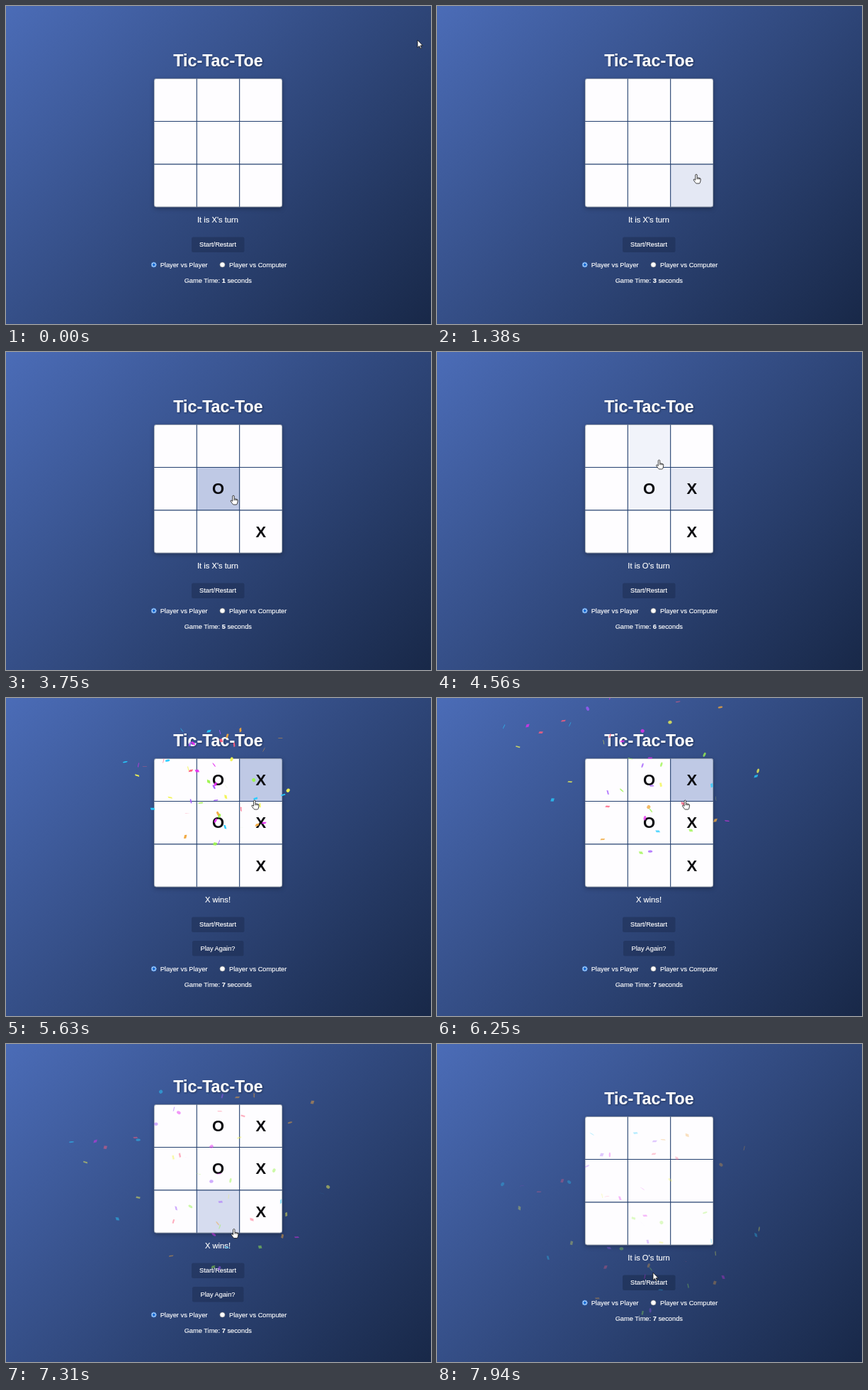
Write an HTML page that moves like this. It is 600 px wide and 448 px high and loops after 8000 ms.

```html
<!DOCTYPE html>
<html lang="en">
<head>
<meta charset="utf-8">
<title>Tic-Tac-Toe</title>
<style>
  html, body { margin: 0; width: 100%; height: 100%; overflow: hidden; }
  body { background: linear-gradient(135deg, #4b6cb7, #182848); }
  svg { display: block; width: 600px; height: 448px; font-family: "Liberation Sans", Arial, sans-serif; }
  text { fill: #fff; font-size: 9.27px; stroke: #fff; stroke-width: .15px; }
  .mid { text-anchor: middle; }
  .title { font-size: 23.2px; font-weight: bold; text-shadow: 1px 1px 2.5px rgba(0, 0, 0, .35); }
  .status { font-size: 11.2px; }
  .mark { font-size: 22px; font-weight: bold; fill: #0b0b0f; stroke: none; }
  .button rect { fill: #182848; fill-opacity: .42; }
  .board { filter: drop-shadow(0 2px 3px rgba(0, 0, 0, .3)); }
  .bold { font-weight: bold; }
</style>
</head>
<body>
<svg viewBox="0 0 600 448">
  <defs><clipPath id="round"><rect x="209" y="102.2" width="181" height="181" rx="3"/></clipPath></defs>
  <g id="upper">
    <text class="mid title" x="299.5" y="85">Tic-Tac-Toe</text>
    <rect class="board" x="209" y="102.2" width="181" height="181" rx="3" fill="#fefdff"/>
    <g id="cells" clip-path="url(#round)"></g>
    <g id="lines" stroke="#24406f" stroke-width="1.1"></g>
    <rect x="209.2" y="102.4" width="180.6" height="180.6" rx="3" fill="none" stroke="#5f6c7c" stroke-width=".6"/>
    <g id="marks"></g>
    <text class="mid status" id="status" x="299" y="305"></text>
    <g class="button">
      <rect id="start" x="262" y="325.5" width="74.5" height="21.5" rx="2.5"/>
      <text class="mid" x="299" y="339.3">Start/Restart</text>
    </g>
  </g>
  <g class="button" id="again">
    <rect x="263" y="342" width="72.5" height="21.5" rx="2.5"/>
    <text class="mid" x="299" y="356">Play Again?</text>
  </g>
  <g id="lower">
    <circle cx="208.7" cy="364.5" r="3.5" fill="#fff" stroke="#3b82dc"/>
    <circle cx="208.7" cy="364.5" r="2.2" fill="#1a6fd8"/>
    <text x="217.7" y="367.8">Player vs Player</text>
    <circle cx="305.5" cy="364.5" r="3.6" fill="#fff" stroke="#767676" stroke-width=".6"/>
    <text x="315" y="367.8">Player vs Computer</text>
    <text class="mid" x="299.3" y="390">Game Time: <tspan class="bold" id="clock"></tspan> seconds</text>
  </g>
  <g id="confetti"></g>
  <path id="cursor" fill="#fff" stroke="#111" stroke-width=".8" stroke-linejoin="round"/>
</svg>
<script>
const LOOP = 8000, STEP = 62.5, FADE = 300, LIFT = 17;
const CLICKS = [1625, 3120, 4000, 4875, 5375];
const WIN = CLICKS[4], RESET = 7812, BURST = 5450;
const LEFT = 209, TOP = 102.2, CELL = 181 / 3, START = 9;

// confetti physics, per tick
const COUNT = 50, TICK = 18.3, TICKS = 200, DECAY = .9, GRAVITY = 1.74, SPEED = 26, SCALE = .6;
const ORIGIN = { x: 300, y: 269 };
const COLORS = ["#26ccff", "#a25afd", "#ff5e7e", "#9cf54e", "#f2f552", "#f0a63c", "#e62ff0"];

const ARROW = "M0 0V10.5L2.5 8.3L4.1 12L5.6 11.3L4.1 7.8H7.3Z";
const HAND = "M-1.2 .8Q0 -.8 1.2 .8V4.8L5 5.5Q6.5 6 6.3 7.5L5.6 11.2Q5.3 13 4 13H.3Q-.8 12.8 -1.5 11.5L-3.8 8.2Q-4 6.9 -2.8 7L-1.2 8.3ZM1.2 5V7.2M3.1 5.4V7.3M4.9 5.8V7.5";

// time, x, y of the pointer tip
const PATH = [
  [0, 581, 48], [1000, 452, 190], [1375, 366, 237], [2600, 366, 237], [2687, 324, 209],
  [3700, 316, 206], [3900, 336, 190], [4375, 336, 190], [4562, 313.5, 152], [5125, 312, 139],
  [5300, 351, 144], [6625, 350, 144], [6750, 347.5, 166], [6880, 347, 168], [7600, 305, 322], [8000, 305, 322]
];

const $ = id => document.getElementById(id);
const clamp = v => Math.max(0, Math.min(1, v));
const show = (el, on) => el.style.display = on ? "" : "none";
const playing = t => t >= WIN && t < RESET;

function add(parent, tag, attrs, text = "") {
  const el = document.createElementNS("http://www.w3.org/2000/svg", tag);
  for (const key in attrs) el.setAttribute(key, attrs[key]);
  el.textContent = text;
  return $(parent).appendChild(el);
}

let seed = 11;
function random() {
  seed = (seed * 16807) % 2147483647;
  return seed / 2147483647;
}

function pointer(t) {
  const i = PATH.findIndex(([time]) => time > t);
  const [t0, x0, y0] = PATH[i - 1], [t1, x1, y1] = PATH[i];
  const k = (t - t0) / (t1 - t0);
  return [x0 + (x1 - x0) * k, y0 + (y1 - y0) * k];
}

// what lies under the pointer: a cell, the start button or nothing
function under(t) {
  const [x, tip] = pointer(t);
  const y = tip + (playing(t) ? LIFT : 0);
  const col = Math.floor((x - LEFT) / CELL), row = Math.floor((y - TOP) / CELL);
  if (col >= 0 && col < 3 && row >= 0 && row < 3) return row * 3 + col;
  return x > 262 && x < 336 && y > 325.5 && y < 347 ? START : -1;
}

// hover strength of every target at every step
const hover = [];
for (let t = 0, now = Array(START + 1).fill(0); t < LOOP; t += STEP) {
  const hot = under(t);
  now = now.map((v, i) => clamp(v + (i === hot ? 1 : -1) * STEP / FADE));
  hover.push(now);
}

const corner = cell => [LEFT + CELL * (cell % 3), TOP + CELL * Math.floor(cell / 3)];

const cells = [...Array(START).keys()].map(cell => {
  const [x, y] = corner(cell);
  return add("cells", "rect", { x, y, width: CELL, height: CELL, fill: "#bfc9e5" });
});

for (const i of [1, 2]) {
  const x = LEFT + CELL * i, y = TOP + CELL * i;
  add("lines", "line", { x1: x, x2: x, y1: TOP, y2: TOP + CELL * 3 });
  add("lines", "line", { x1: LEFT, x2: LEFT + CELL * 3, y1: y, y2: y });
}

const marks = CLICKS.map((time, i) => {
  const [x, y] = corner(under(time - 1));
  return add("marks", "text", { class: "mid mark", x: x + CELL / 2, y: y + CELL / 2 + 7.7 }, i % 2 ? "O" : "X");
});

const pieces = Array.from({ length: COUNT }, (_, i) => {
  const angle = (random() - .5) * 70 * Math.PI / 180;
  const reach = SPEED * (.5 + random()) / (1 - DECAY);
  return {
    dx: reach * Math.sin(angle),
    dy: -reach * Math.cos(angle),
    wobble: random() * 10,
    speed: Math.min(.11, random() * .1 + .05),
    tilt: (random() * .5 + .25) * Math.PI,
    size: (2 + random()) * SCALE,
    round: random() < .5,
    el: add("confetti", "path", { fill: COLORS[i % COLORS.length] })
  };
});

function drawPiece(p, n) {
  const k = 1 - DECAY ** n;
  const x = ORIGIN.x + p.dx * k, y = ORIGIN.y + p.dy * k + n * GRAVITY;
  const wobble = p.wobble + p.speed * n, tilt = p.tilt + .1 * n;
  const wx = 10 * SCALE * Math.cos(wobble), wy = 10 * SCALE * Math.sin(wobble);
  const tx = p.size * Math.cos(tilt), ty = p.size * Math.sin(tilt);
  const rx = Math.abs(wx) * .6, ry = Math.abs(wy) * .6;
  p.el.setAttribute("d", p.round
    ? `M${-rx} 0A${rx} ${ry} 0 1 0 ${rx} 0A${rx} ${ry} 0 1 0 ${-rx} 0Z`
    : `M0 0L${wx} ${ty}L${wx + tx} ${wy + ty}L${tx} ${wy}Z`);
  p.el.setAttribute("transform", `translate(${x} ${y}) rotate(${p.round ? 18 * wobble : 0})`);
}

function render(time) {
  const step = Math.floor((time + 3) / STEP) % hover.length;
  const t = step * STEP;
  const won = playing(t);
  const lift = won ? LIFT : 0;
  const turns = CLICKS.filter(at => t >= at).length;

  $("upper").setAttribute("transform", `translate(0 ${-lift})`);
  $("lower").setAttribute("transform", `translate(0 ${lift})`);
  show($("again"), won);
  $("status").textContent = won ? "X wins!" : `It is ${turns % 2 ? "O" : "X"}'s turn`;
  $("clock").textContent = Math.min(7, 1 + (t >= 60) + Math.floor(t / 1000));
  $("start").style.fillOpacity = .42 + .35 * hover[step][START];

  cells.forEach((el, i) => el.setAttribute("opacity", hover[step][i]));
  marks.forEach((el, i) => show(el, i < turns && t < RESET));

  const n = (t - BURST) / TICK;
  show($("confetti"), n > 0);
  $("confetti").setAttribute("fill-opacity", clamp(1 - n / TICKS));
  if (n > 0) for (const p of pieces) drawPiece(p, n);

  const [x, y] = pointer(t);
  $("cursor").setAttribute("d", under(t) < 0 ? ARROW : HAND);
  $("cursor").setAttribute("transform", `translate(${x} ${y})`);
}

const begin = performance.now();
function loop() {
  render((performance.now() - begin) % LOOP);
  requestAnimationFrame(loop);
}
loop();
</script>
</body>
</html>
```
